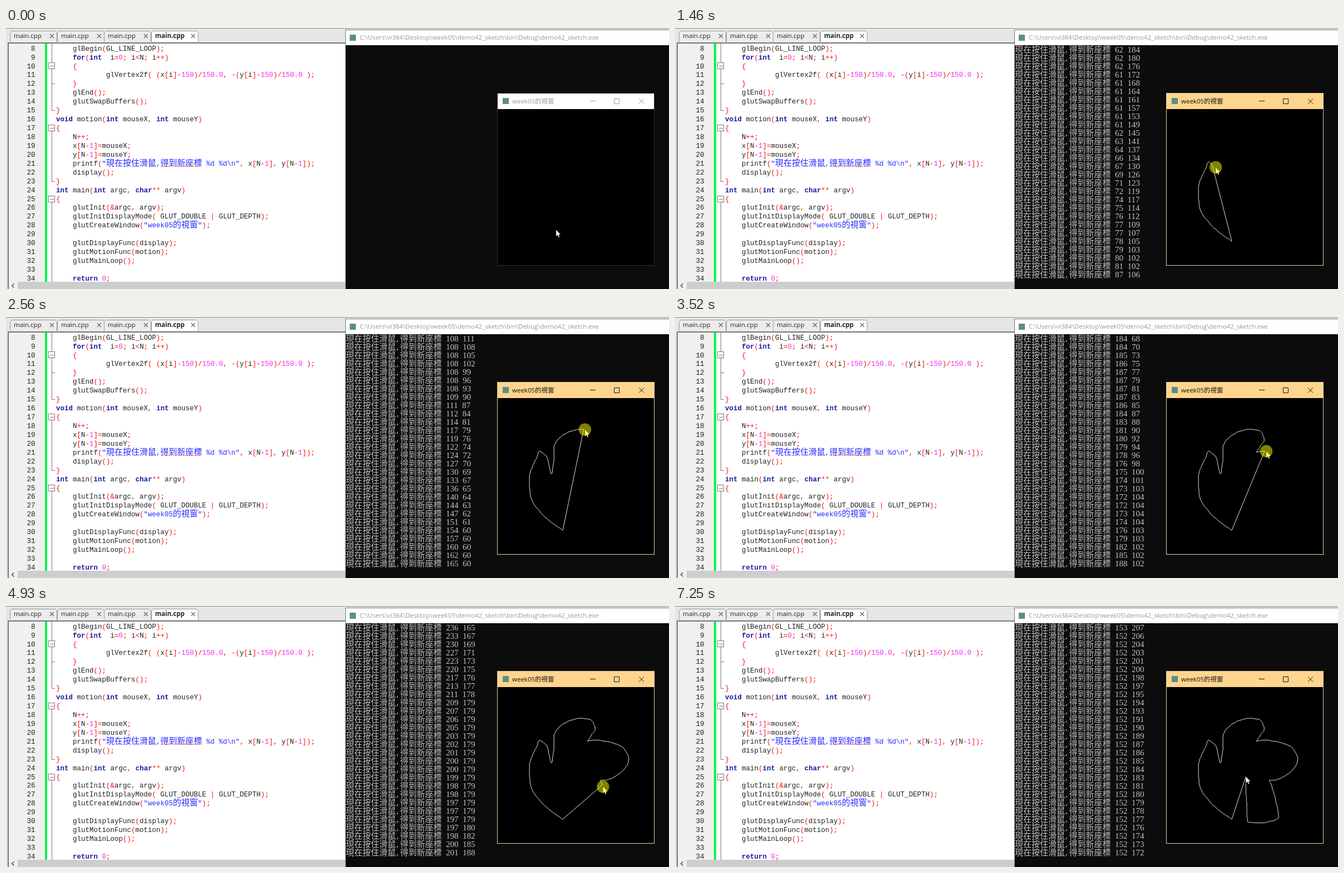
These frames come from a looping animation (1192x470 px, 7.32 s). An HTML page:

```html
<!DOCTYPE html>
<html lang="zh-Hant">
<head>
<meta charset="utf-8">
<title>Mouse drawing</title>
<style>
  html, body { margin: 0; width: 100%; height: 100%; overflow: hidden; background: #e6e6e6; }
  svg { display: block; width: 1192px; height: 470px; }
  text { white-space: pre; }
  .code { font: 12.5px "Liberation Mono", monospace; fill: #222; }
  .wide { font: 15px "Noto Sans CJK TC", "Noto Sans CJK", sans-serif; }
  .keyword { fill: #1818a0; font-weight: bold; }
  .string { fill: #2a2aff; }
  .number { fill: #f030f0; }
  .operator { fill: #ff1010; }
  .tab { font: 11.5px "Open Sans", sans-serif; fill: #222; }
  .tab.active { font-weight: bold; }
  .title { font: 11.5px "Open Sans", "Noto Sans CJK TC", "Noto Sans CJK", sans-serif; }
  .log { fill: #c4c4c4; }
  .digits { font: 15px "Liberation Serif", serif; word-spacing: 3.75px; }
  .line { fill: none; stroke: #777; shape-rendering: crispEdges; }
  #window { --bar: #fff; --ink: #999; --edge: #303030; }
  #window.active { --bar: #ffd58e; --ink: #111; --edge: #e8d3a4; }
</style>
</head>
<body>
<svg id="stage" viewBox="0 0 1192 470">
  <rect width="1192" height="470" fill="#e6e6e6"/>
  <rect width="1192" height="1" fill="#8c8c8c"/>
  <g id="tabs"></g>

  <rect x="3" y="26" width="608" height="444" fill="#777"/>
  <rect x="5" y="28" width="606" height="442" fill="#fff"/>
  <rect x="5" y="28" width="65" height="430" fill="#f0f0f0"/>
  <rect x="70" y="28" width="4" height="430" fill="#00f74c"/>
  <path class="line" d="M82.5 28V148.5H88M82.5 100.5H88M82.5 180V276.5H88M82.5 308V458"/>
  <g id="folds"></g>
  <g id="code" class="code"></g>
  <path id="squiggle" fill="none" stroke="#f44" stroke-width=".8"/>
  <rect x="5" y="457" width="606" height="13" fill="#f0f0f0"/>
  <rect x="21" y="457" width="590" height="13" fill="#cdcdcd"/>
  <path d="M14.5 460.5L10.5 464L14.5 467.5" fill="none" stroke="#444" stroke-width="1.4"/>

  <rect x="610" y="3" width="582" height="467" fill="#777"/>
  <rect x="611" y="4" width="581" height="27" fill="#fff"/>
  <rect x="611" y="31" width="581" height="439" fill="#0c0c0c"/>
  <rect x="618" y="12" width="11" height="11" fill="#5b8d89"/>
  <text class="title" x="636" y="21" fill="#999">C:\Users\vi384\Desktop\week05\demo42_sketch\bin\Debug\demo42_sketch.exe</text>
  <g id="log" class="log"></g>

  <g id="window">
    <rect x="883.5" y="117.5" width="282" height="310" fill="#000" stroke="var(--edge)"/>
    <rect x="884" y="118" width="281" height="28" fill="var(--bar)"/>
    <rect x="893" y="126" width="11" height="11" fill="#5b8d89"/>
    <text class="title" x="910" y="136" fill="var(--ink)">week05的視窗</text>
    <path d="M1050 131.5h10M1093.5 127.5h9v9h-9zM1138 127.5l9 9m0-9l-9 9" fill="none" stroke="var(--ink)"/>
    <polygon id="drawing" fill="none" stroke="#e2e2dc"/>
  </g>
  <g id="cursor">
    <path d="M0 0V12L2.8 9.5L4.6 13.6L6.5 12.8L4.7 8.8H8.4Z" fill="#fff" stroke="#000" stroke-width=".4"/>
    <circle id="press" r="11.2" fill="#ff0" fill-opacity=".51"/>
  </g>
</svg>
<script>
const LOOP = 7320, RELEASE = 7250, ROWS = 28, SCALE = 281 / 300;
const $ = id => document.getElementById(id);

function add(parent, tag, attrs, text = '') {
  const node = document.createElementNS('http://www.w3.org/2000/svg', tag);
  for (const name in attrs) node.setAttribute(name, attrs[name]);
  node.textContent = text;
  return parent.appendChild(node);
}

// Editor
for (let k = 0; k < 4; k++) {
  const x = Math.round(7 + k * 84.6), active = k === 3;
  add($('tabs'), 'path', {
    d: `M${x + .5} 25V8.5l3 -3h78l3 3V25`,
    fill: active ? '#fff' : '#ececec', stroke: '#999'
  });
  add($('tabs'), 'text', { class: active ? 'tab active' : 'tab', x: x + 7, y: 18 }, 'main.cpp');
  add($('tabs'), 'path', { d: `M${x + 72} 11l7 7m0-7l-7 7`, stroke: '#666', 'stroke-width': 1.3 });
}

for (const y of [68, 180, 308]) {
  add($('folds'), 'path', { class: 'line', style: 'fill:#fff',
    d: `M76.5 ${y - 5.5}h11v11h-11zM78.5 ${y + .5}h7` });
}

const source = String.raw`    glBegin(GL_LINE_LOOP);
    for(int  i=0; i<N; i++)
    {
            glVertex2f( (x[i]-150)/150.0, -(y[i]-150)/150.0 );
    }
    glEnd();
    glutSwapBuffers();
}
void motion(int mouseX, int mouseY)
{
    N++;
    x[N-1]=mouseX;
    y[N-1]=mouseY;
    printf("現在按住滑鼠,得到新座標 %d %d\n", x[N-1], y[N-1]);
    display();
}
int main(int argc, char** argv)
{
    glutInit(&argc, argv);
    glutInitDisplayMode( GLUT_DOUBLE | GLUT_DEPTH);
    glutCreateWindow("week05的視窗");

    glutDisplayFunc(display);
    glutMotionFunc(motion);
    glutMainLoop();

    return 0;`;

function tokenClass(token) {
  if (token[0] === '"') return 'string';
  if (/^(for|int|void|char|return)$/.test(token)) return 'keyword';
  if (/^\d/.test(token)) return 'number';
  return /^[\w\s]/.test(token) ? '' : 'operator';
}

source.split('\n').forEach((line, k) => {
  const y = 40.7 + k * 15.93;
  add($('code'), 'text', { x: 52.5, y, 'text-anchor': 'end' }, k + 8);
  const row = add($('code'), 'text', { x: 90, y });
  for (const token of line.match(/"[^"]*"|\d+\.\d+|\w+|\s+|[^\w\s"]/g) || []) {
    for (const run of token.split(/([\u4e00-\u9fff]+)/)) {
      const wide = /[\u4e00-\u9fff]/.test(run) ? ' wide' : '';
      add(row, 'tspan', { class: tokenClass(token) + wide }, run);
    }
  }
});
$('squiggle').setAttribute('d', 'M278 250' + 'l2 -2l2 2'.repeat(18));

// Console rows
const rows = Array.from({ length: ROWS }, (_, k) => {
  const y = 44.3 + k * 15, group = add($('log'), 'g', {});
  add(group, 'text', { class: 'wide', x: 611, y }, '現在按住滑鼠');
  add(group, 'text', { class: 'digits', x: 702, y }, ',');
  add(group, 'text', { class: 'wide', x: 708.5, y }, '得到新座標');
  return { group, label: add(group, 'text', { class: 'digits', x: 791, y }) };
});

// Mouse path: sample number, x, y
const path = [
  [-6, 112, 232], [0, 125, 254], [12, 87, 225], [22, 62, 184], [30, 61, 153],
  [41, 75, 114], [48, 81, 102], [50, 94, 112], [59, 103, 146], [67, 108, 111],
  [72, 108, 96], [81, 124, 72], [91, 157, 60], [101, 179, 63], [111, 187, 81],
  [117, 180, 92], [125, 172, 104], [132, 188, 102], [144, 236, 113], [150, 252, 138],
  [157, 236, 165], [167, 207, 179], [180, 197, 179], [184, 201, 188], [197, 215, 250],
  [204, 182, 261], [214, 155, 259], [231, 154, 230], [254, 152, 194], [272, 152, 172]
];
// Time in ms, sample number
const clock = [
  [0, -6], [250, 0], [1460, 49], [2350, 81], [2560, 94], [3520, 132], [4540, 180],
  [4860, 180], [4930, 184], [5620, 218], [6020, 231], [6990, 272], [LOOP, 272]
];
// The picture advances in steps of about 70 ms between these times
const stops = [0, 1460, 2560, 3520, 4540, 4930, 6020, 6990, RELEASE, LOOP];

const segment = (table, key) => Math.max(1, table.findIndex(row => row[0] >= key));

function sampleAt(t) {
  const k = segment(clock, t), [t0, i0] = clock[k - 1], [t1, i1] = clock[k];
  return i0 + (i1 - i0) * (t - t0) / (t1 - t0);
}

// Monotone cubic: smooth along a stroke, no overshoot at the corners
const slope = (k, c) => (path[k][c] - path[k - 1][c]) / (path[k][0] - path[k - 1][0]);
function tangent(k, c) {
  if (k === 0) return slope(1, c);
  if (k === path.length - 1) return slope(k, c);
  const a = slope(k, c), b = slope(k + 1, c);
  return a * b > 0 ? 2 * a * b / (a + b) : 0;
}
function mouseAt(i) {
  const k = segment(path, i), a = path[k - 1], b = path[k];
  const h = b[0] - a[0], f = (i - a[0]) / h, g = 1 - f;
  return [1, 2].map(c => a[c] * g * g * (1 + 2 * f) + b[c] * f * f * (1 + 2 * g)
    + h * f * g * (tangent(k - 1, c) * g - tangent(k, c) * f));
}

function stepTime(t) {
  const k = stops.findIndex(s => s > t);
  const from = stops[k - 1], span = stops[k] - from;
  const count = Math.max(1, Math.round(span / 70));
  return from + Math.floor((t - from) / span * count) * span / count;
}

const last = path.at(-1)[0];
const toStage = ([x, y]) => [884 + x * SCALE, 146 + y * SCALE];
const samples = Array.from({ length: last + 1 }, (_, i) => mouseAt(i).map(Math.round));
const vertices = samples.map(p => toStage(p).map(v => v.toFixed(1)).join());

function draw(t) {
  const index = sampleAt(stepTime(t));
  const started = index >= 0;
  const count = started ? Math.floor(index + 1e-6) + 1 : 0;
  const first = Math.max(0, count - ROWS);

  $('window').classList.toggle('active', started);
  $('drawing').setAttribute('points', vertices.slice(0, count).join(' '));
  rows.forEach(({ group, label }, k) => {
    const shown = first + k < count;
    group.style.display = shown ? '' : 'none';
    if (shown) label.textContent = samples[first + k].join(' ');
  });

  // The pointer runs one sample ahead of the printed output
  const tip = toStage(mouseAt(Math.min(last, index + (started ? 1 : 0))));
  $('cursor').setAttribute('transform', `translate(${tip})`);
  $('press').style.display = started && t < RELEASE ? '' : 'none';
}

const start = performance.now();
function tick() {
  draw((performance.now() - start) % LOOP);
  requestAnimationFrame(tick);
}
tick();
</script>
</body>
</html>
```
